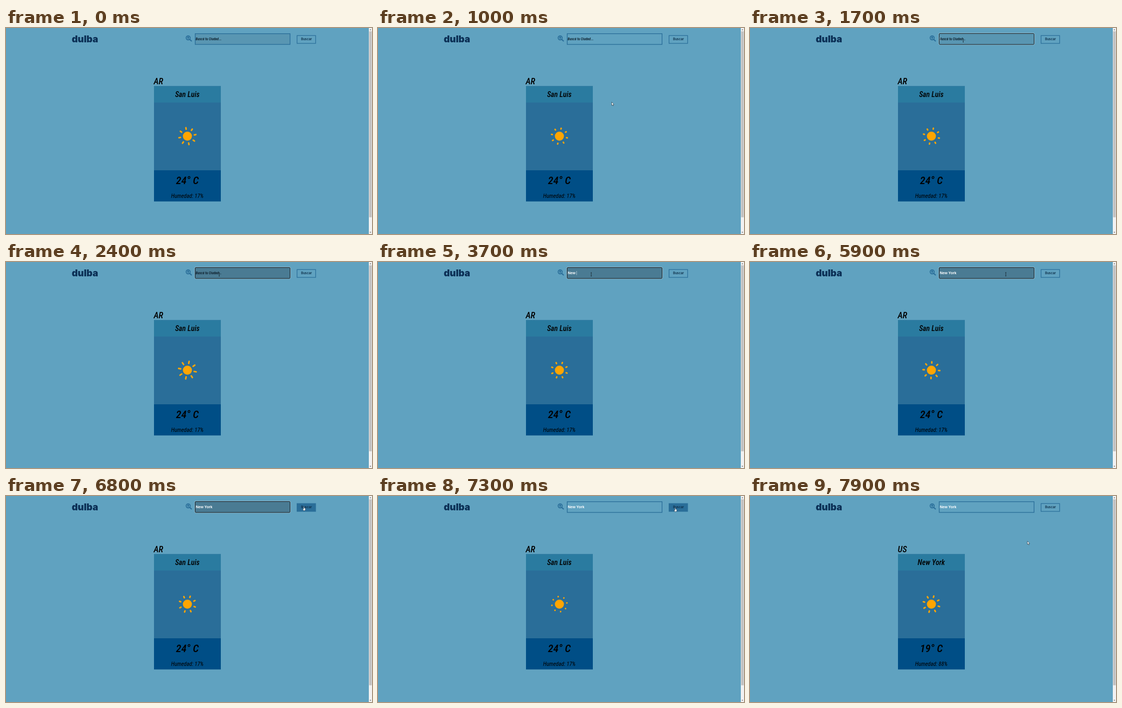
Recreate the animation shown at these times as an HTML page. Size 690 by 388 pixels, loop 8 s.

```html
<!DOCTYPE html>
<html lang="es">
<head>
<meta charset="utf-8">
<style>
  html, body { margin: 0; width: 100%; height: 100%; overflow: hidden; background: #60a2c0; }
  svg { display: block; width: 690px; height: 388px; }
  .card text, #hint { font-family: "Roboto Condensed", Roboto, sans-serif; font-stretch: 75%; font-style: italic; font-weight: 500; }
  .card .mid { text-anchor: middle; }
  #typed { font: bold 7px "Liberation Sans", Arial, sans-serif; white-space: pre; fill: #fff; }
  .brand { font: 900 17.5px Inter, sans-serif; fill: #0b2f55; }
  .label { font: 600 6px Inter, sans-serif; fill: #0b2b45; text-anchor: middle; }
</style>
</head>
<body>
<svg viewBox="0 0 690 388">
  <rect width="690" height="388" fill="#60a2c0"/>
  <text class="brand" x="124" y="27.3">dulba</text>

  <g fill="none" stroke="#2a6e99" stroke-width="1.7">
    <circle cx="343.4" cy="18.6" r="3.8"/>
    <path d="M346.4 21.5L349.6 24.4" stroke-width="2" stroke-linecap="round"/>
    <path d="M343.4 21.2L341.8 18.6A1.7 1.7 0 1 1 345 18.6Z" fill="#2a6e99" stroke="none"/>
  </g>

  <rect id="fill" x="356.5" y="10.5" width="179" height="20.5" fill="#4a7b93"/>
  <rect id="border" x="356.7" y="10.7" width="178.8" height="20.2" fill="none" stroke="#2a6e99" stroke-width="1.3"/>
  <g id="ring" fill="none">
    <rect x="355.9" y="9.7" width="180.4" height="22" rx="2" stroke="#d5e6ef" stroke-width=".6"/>
    <rect x="356.6" y="10.4" width="179" height="20.6" rx="1.4" stroke="#10161a"/>
  </g>
  <text id="hint" x="357.6" y="23.4" font-size="6.9" fill="#0a1a26">Buscá tu Ciudad...</text>
  <text id="typed" x="357.8" y="23.3"></text>
  <rect id="caret" y="17" width=".6" height="7.5" fill="#dce8ee"/>

  <rect id="button" x="548.7" y="14.2" width="35" height="14.8" stroke="#2a6e99" stroke-width="1.2"/>
  <text class="label" x="566.4" y="23.3">Buscar</text>

  <g class="card">
    <text id="country" x="278.6" y="105.6" font-size="16.2"></text>
    <rect x="279" y="109.5" width="126" height="217" fill="#2a6e99"/>
    <rect x="279" y="109.5" width="126" height="31" fill="#2a7ba0"/>
    <rect x="279" y="268" width="126" height="58.5" fill="#004e86"/>
    <text id="city" class="mid" x="341.8" y="130.4" font-size="14.1"></text>
    <text id="temp" class="mid" x="342" y="294.2" font-size="20.2"></text>
    <text id="humidity" class="mid" x="341.8" y="320" font-size="10.7" style="font-weight:400"></text>
  </g>

  <g transform="translate(342 203.7) scale(1.42)">
    <path id="rays" stroke="orange" stroke-width="2" stroke-linecap="round"/>
    <circle r="6" fill="orange"/>
  </g>

  <rect x="684" width="6" height="388" fill="#f1f1f1"/>
  <rect x="684.6" y="6.2" width="4.9" height="350.3" fill="#c1c1c1"/>
  <path d="M685.6 3.9L687 2.2L688.4 3.9ZM685.6 384L687 385.7L688.4 384Z" fill="#505050"/>

  <g id="cursor" stroke-linejoin="round">
    <path id="arrow" d="M0 0V6.2L1.4 5L2.4 7.2L3.4 6.7L2.5 4.6H4.3Z" fill="#fff" stroke="#1c2a35" stroke-width=".6"/>
    <path id="beam" d="M-1 0H1M0 0V6.5M-1 6.5H1" fill="none" stroke="#10181e" stroke-width=".7"/>
    <path id="hand" d="M-.6 .5Q0 -.3 .6 .5V3L3 3.8L2.7 6.5L2 7.8H-.8L-2.3 5L-.6 5Z" fill="#fff" stroke="#14222d" stroke-width=".5"/>
  </g>
</svg>
<script>
const LOOP = 8000, SUN_START = 3680;
const $ = id => document.getElementById(id);
const clamp = v => Math.min(1, Math.max(0, v));
const ramp = (t, from, to) => clamp((t - from) / (to - from));
const show = (id, on) => $(id).setAttribute("visibility", on ? "visible" : "hidden");
const set = (id, attrs) => { for (const k in attrs) $(id).setAttribute(k, attrs[k]); };

// Pointer stops: time, x, y
const path = [[150, 464, 361], [950, 440.5, 139.5], [1050, 440.5, 139.5], [1550, 402, 20],
  [5600, 402, 20], [6200, 561.6, 19.6], [7250, 561.6, 19.6], [7650, 523, 85]];
// Time of each key press
const word = "New York", keys = [2900, 3100, 3300, 3500, 4300, 4950, 5100, 5250];
const places = [["AR", "San Luis", "24° C", "Humedad: 17%"], ["US", "New York", "19° C", "Humedad: 88%"]];

// cubic-bezier(.42, 0, .58, 1)
function easeInOut(x) {
  let lo = 0, hi = 1, s = .5;
  for (let i = 0; i < 24; i++) {
    s = (lo + hi) / 2;
    const bx = 1.26 * s * (1 - s) ** 2 + 1.74 * s * s * (1 - s) + s ** 3;
    if (bx < x) lo = s; else hi = s;
  }
  return s * s * (3 - 2 * s);
}

function pointer(t) {
  const i = path.findIndex(p => p[0] > t);
  if (i < 1) return path[i < 0 ? path.length - 1 : 0].slice(1);
  const [t0, x0, y0] = path[i - 1], [t1, x1, y1] = path[i];
  const k = easeInOut(ramp(t, t0, t1));
  return [x0 + (x1 - x0) * k, y0 + (y1 - y0) * k];
}

function drawSun(t) {
  const turn = 360 * easeInOut(t / 9000 % 1);
  const shrink = 1 - Math.abs(1 - t / 1000 % 2);
  const inner = 9 + shrink, outer = inner + 3 - 2.9 * shrink;
  let d = "";
  for (let i = 0; i < 8; i++) {
    const a = (turn + 45 * i) * Math.PI / 180, c = Math.cos(a), s = Math.sin(a);
    d += `M${c * inner} ${s * inner}L${c * outer} ${s * outer}`;
  }
  set("rays", { d });
}

function drawForm(t) {
  const focused = t >= 1700 && t < 7050;
  const shade = t < 1000 ? .3 : .3 * ramp(t, 1450, 1550) + .7 * ramp(t, 1700, 2050) - ramp(t, 7000, 7200);
  set("fill", { opacity: shade });
  show("ring", focused);
  show("border", !focused);

  const count = keys.filter(k => k <= t).length;
  show("hint", !count);
  $("typed").textContent = word.slice(0, count);
  const width = count ? $("typed").getComputedTextLength() : 0;
  const since = t - (count ? keys[count - 1] : 1700);
  set("caret", { x: 357.9 + width });
  show("caret", focused && since % 1000 < 500);
}

function drawPointer(t) {
  const [x, y] = pointer(t);
  const overInput = x > 356 && x < 536 && y > 5 && y < 31;
  const overButton = x > 548 && x < 584 && y > 13 && y < 29;
  const kind = overInput ? "beam" : overButton ? "hand" : "arrow";
  set("cursor", { transform: `translate(${x} ${y})` });
  for (const id of ["arrow", "beam", "hand"]) show(id, t >= 150 && id === kind);
  set("button", { fill: overButton ? "#2a6e99" : "none" });
}

function draw(t) {
  drawSun(t + SUN_START);
  drawForm(t);
  drawPointer(t);
  const place = places[t < 7500 ? 0 : 1];
  ["country", "city", "temp", "humidity"].forEach((id, i) => $(id).textContent = place[i]);
}

const start = performance.now();
function tick() {
  draw((performance.now() - start) % LOOP);
  requestAnimationFrame(tick);
}
tick();
</script>
</body>
</html>
```
